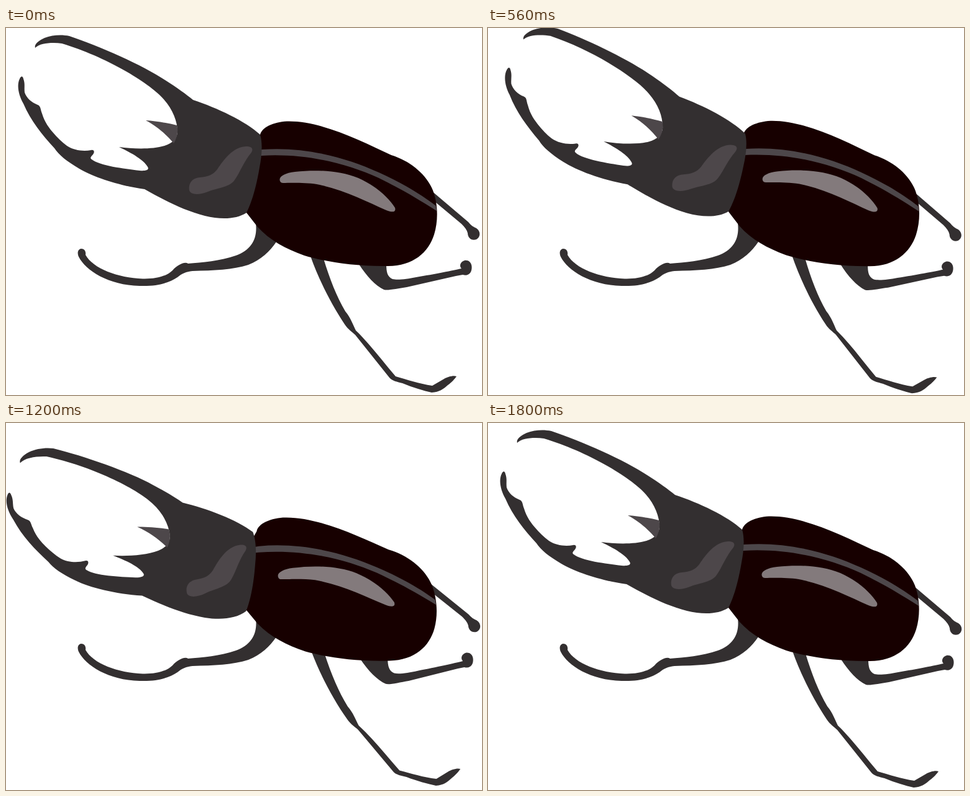
An HTML page that plays this animation: 766x592 px, repeating every 1.84 s.

```html
<!DOCTYPE html>
<html lang="en">
<head>
<meta charset="utf-8">
<title>Beetle</title>
<style>
@property --dip { syntax: "<number>"; inherits: true; initial-value: 0; }
html, body { margin: 0; width: 100%; height: 100%; overflow: hidden; background: #fff; }
svg { display: block; width: 766px; height: 592px; animation: nod 1840ms infinite; }
.dark { fill: #332f30; }
.shell { fill: #170000; }
.grey { fill: #4d474a; }
.shine { fill: #837a7c; }

/* --dip is how far the jaw tip sits below rest, in pixels */
#head { transform-origin: 458px 305px; transform: matrix(1, calc(var(--dip) * -0.0025), calc(var(--dip) * 0.0028), 1, 0, 0); }
#body { transform-origin: 580px 320px; transform: matrix(1, calc(var(--dip) * -0.0005), calc(var(--dip) * 0.0012), 1, 0, 0); }
#legs { transform-origin: 560px 290px; transform: rotate(calc(var(--dip) * -0.042deg)); }

@keyframes nod {
  0% { --dip: 0; animation-timing-function: steps(14); }
  30.4348% { --dip: -13.2; animation-timing-function: steps(1); }
  32.6087% { --dip: -11; animation-timing-function: steps(14); }
  63.0435% { --dip: 33.7; animation-timing-function: steps(16); }
  97.8261%, 100% { --dip: 0; }
}
</style>
</head>
<body>
<svg viewBox="0 0 766 592">
  <g id="legs" class="dark">
    <path d="M684 262 L744 313 C748 318 752 321 757 323 C764 328 764 337 757 341 C749 344 743 338 743 331 C742 326 738 321 733 316 L690 280Z"/>
    <path d="M568 381 C580 400 595 416 608 422 C614 424 630 420 645 418 L724 400 L735 398 C745 401 750 394 749.5 385 C749 377 743 374 738 375 C731 377 729 384 733 388 C720 391 690 397 660 402 C645 405 630 407 622 405 C614 401 612 395 612 380Z"/>
    <path d="M490 368 C503 405 523 445 545 478 C550 486 558 491 562 495 L617 564 C621 569 630 571 638 573 C655 580 672 585 685 588 C698 587 703 583 711 576 C718 571 722 566 725 562 C720 560 710 563 705 566 L686 577 C665 574 645 567 627 562 C604 535 584 508 563 488 C558 478 555 468 546 457 C532 433 521 405 511 372Z"/>
  </g>
  <path class="dark" d="M402 315 C405 340 395 358 370 367 C345 376 315 378 293 380 C287 376 275 383 268 391 C258 401 240 405 220 404.5 C180 403 140 388 128 366 C129 360 126 356 121 356 C116 357 114 362 117 369 C128 391 165 415 215 416 C245 417 262 411 276 402 C283 396 290 393 300 392 C335 391 365 390 390 382 C410 374 425 360 435 345 L425 322Z"/>
  <g id="body">
    <path class="shell" d="M398 190 L409 172 C412 160 430 152 452 150.5 C505 149 570 181 620 205 C652 215 677 237 687 262 C695 283 696 310 689 333 C680 362 655 384 615 384 C560 385 510 376 480 367 C450 356 425 343 405 321 L387 298 L380 285Z"/>
    <path class="grey" d="M398 198 L412 196 C480 191 545 208 600 233 C640 251 670 270 692 287 L693 295 C660 274 640 262 600 242 C545 217 480 202 411 206 L398 207Z"/>
    <path class="shine" d="M441 247 C438 240 448 234 465 232 C500 228 537 230 567 242 C596 255 616 274 626 290 C628 297 622 298 612 294 C580 280 545 261 500 252 C480 249 455 250 446 250 Q442 250 441 247Z"/>
  </g>
  <g id="head">
    <path class="dark" d="M47 32 C45 26 53 20 62 16 C75 11 90 10.5 102 13 C150 29 220 60 256 84 C275 96 290 107 301 116 C340 129 385 150 409 172 C413 185 412 205 408 225 C403 255 396 280 387 298
      C370 309 345 309 320 303 C285 294 255 278 223 260 C180 254 140 240 118 227 C98 215 85 205 78 194 C58 172 40 150 28 122 C20 108 17 92 22 82 C24 77 27 77 28 82 C31 90 29 96 30 104 C33 113 41 120 51 124 C56 126 55 130 58 138
      C62 152 70 162 76 169 C82 176 90 184 98 190 C110 198 125 199 137 197 C142 196 143 200 140 204 C136 208 135 210 138 212 C150 222 190 227 215 230 C225 231 231 229 228 224 C222 213 203 202 182 192
      C205 195 235 196 255 190 C268 186 275 178 276 168 C276 150 268 130 252 113 C230 88 160 46 90 25 C75 23 55 24 47 32Z"/>
    <path class="grey" d="M225 149 C240 150 260 153 275 157 Q279 170 270 186 C258 172 245 160 225 149Z"/>
    <path class="grey" d="M295 262 C293 250 300 242 312 241 C325 240 333 237 340 228 C350 213 365 192 386 191 C396 191 399 195 394 202 C383 215 377 232 368 245 C360 257 340 258 325 264 C310 270 297 269 295 262Z"/>
  </g>
</svg>
</body>
</html>
```
